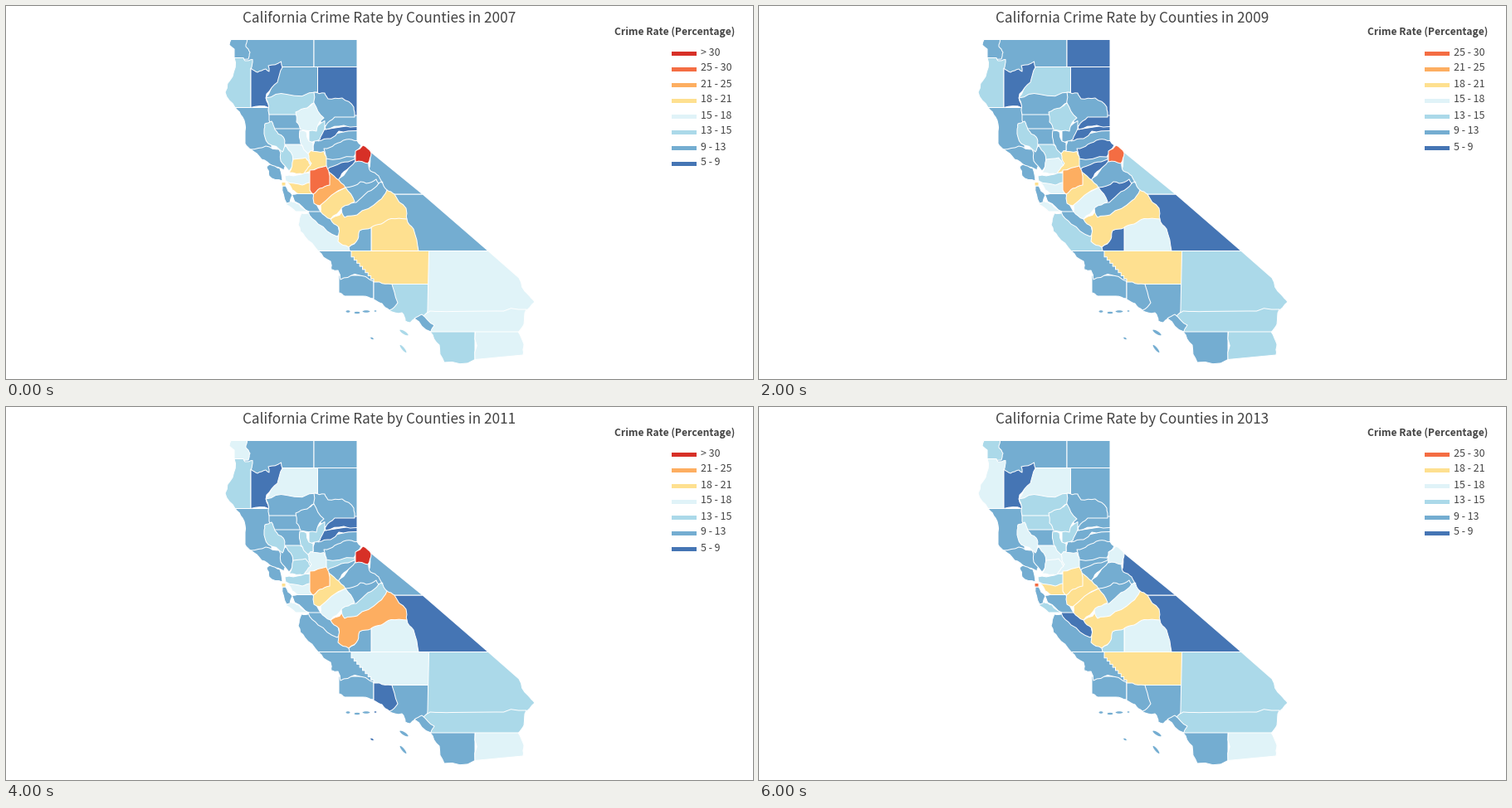
Animation of 900x450 px, one loop 7 s. Source, as a matplotlib script:

```python
import math
import random

import matplotlib.pyplot as plt
from matplotlib.animation import FuncAnimation
from matplotlib.patches import Ellipse, Polygon, Rectangle

W, H, DPI = 900, 450, 100
PX = 72 / DPI  # points per pixel
FIRST, COUNT = 2007, 7
FONT = "Noto Sans CJK JP"
INK = "#444444"

COLORS = ["#313695", "#4575b4", "#74add1", "#abd9e9", "#e0f3f8",
          "#fee090", "#fdae61", "#f46d43", "#d73027"]
BOUNDS = [5, 9, 13, 15, 18, 21, 25, 30]
LABELS = ["< 5", *(f"{a} - {b}" for a, b in zip(BOUNDS, BOUNDS[1:])), "> 30"]

# Statewide straight survey lines
TOP, MODOC, NORTH, SOUTH = 40.5, 73.5, 122.5, 295.5
EAST, KERN = 423, 509.5

rng = random.Random(4)
fig = plt.figure(figsize=(W / DPI, H / DPI), dpi=DPI, facecolor="white")
ax = fig.add_axes([0, 0, 1, 1])
ax.set_xlim(0, W)
ax.set_ylim(H, 0)
ax.axis("off")

areas = []


def ragged(a, b, depth=2):
    """Points from a up to b; surveyed or long lines stay straight."""
    dx, dy = b[0] - a[0], b[1] - a[1]
    size = math.hypot(dx, dy)
    if depth == 0 or dx == 0 or dy == 0 or size < 4 or size > 45:
        return [a]
    bend = rng.uniform(-0.1, 0.1)
    mid = (a[0] + dx / 2 - dy * bend, a[1] + dy / 2 + dx * bend)
    return ragged(a, mid, depth - 1) + ragged(mid, b, depth - 1)


def add_area(patch, level, changes):
    """Keep a patch with its level per year; changes maps a year to a level."""
    patch.set(edgecolor="white", linewidth=PX, snap=False)
    ax.add_patch(patch)
    levels = []
    for year in range(FIRST, FIRST + COUNT):
        level = changes.get(year, level)
        levels.append(level)
    areas.append((patch, levels))


def county(*corners, level=2, changes={}):
    outline = []
    for a, b in zip(corners, corners[1:] + corners[:1]):
        outline += ragged(a, b)
    add_area(Polygon(outline, joinstyle="round"), level, changes)


def island(x, y, w, h, tilt=0, level=2, changes={}):
    add_area(Ellipse((x, y), w, h, angle=tilt), level, changes)


def label(x, y, text, size, **kw):
    return ax.text(x, y, text, fontsize=size * PX, family=FONT, color=INK,
                   va="baseline", **kw)


# Later areas overlap earlier ones, so each shared border is drawn once.

# Siskiyou, Modoc, Lassen, Shasta
county((290, TOP), (371, TOP), (371, MODOC), (325, 84), (297, 84), (285, 60))
county((371, TOP), (EAST, TOP), (EAST, MODOC), (371, MODOC),
       changes={2009: 1, 2011: 2})
county((375.5, MODOC), (EAST, MODOC), (EAST, 138), (375.5, 125),
       level=1, changes={2010: 2})
county((325, MODOC), (375.5, MODOC), (375.5, 110), (310, 115),
       changes={2008: 4, 2009: 3, 2010: 4, 2012: 5, 2013: 4})

# Mendocino, Sonoma, Napa, Colusa, Glenn, Yolo, Lake
county((276, NORTH), (320, NORTH), (320, 174), (296, 173.5), (288, 166),
       (288, 151), (285, 134))
county((295, 173), (313, 169), (330, 173), (337, 190), (335, 198), (320, 193),
       (308, 185))
county((327, 168), (342, 170), (348, 184), (341, 199), (331, 187),
       changes={2007: 3, 2008: 2})
county((318, 145), (357, 145), (358, 168), (328, 168))
county((317, 128), (354, 128), (356, 148), (323, 148), (317, 138),
       changes={2013: 3})
county((336, 167), (354, 167), (366, 175), (368, 192), (362, 198), (347, 190),
       (345, 180), level=4, changes={2009: 3, 2013: 4})
county((312, 142), (320, 139), (324, 149), (334, 158), (336, 168), (333, 176),
       (316, 166), (311, 150), level=3, changes={2010: 4, 2011: 3, 2012: 4})

# Del Norte, Humboldt, Trinity, Tehama
county((271, TOP), (290.5, TOP), (289, 49), (294, 56), (292, 64), (275, 62.5),
       (275, 52), (269, 47), changes={2010: 3, 2011: 4, 2012: 3})
county((275, 62.5), (286, 62.5), (288, 66), (297, 64.5), (295, 76),
       (295, NORTH), (276, NORTH), (264, 104), (273, 85),
       level=3, changes={2010: 4, 2011: 3, 2012: 4})
county((295, 75), (303, 80), (313, 76), (317, 79), (316, 72), (331.5, 67),
       (333, 74), (327, 92), (314, 106), (317, 123), (295, NORTH),
       level=1, changes={2008: 0, 2009: 1})
county((313, 111), (338, 106.5), (375, 104), (371, 117), (363, 123),
       (352, 131), (317, 131), level=3, changes={2009: 2, 2010: 3, 2011: 2,
                                                 2012: 3})

# Placer, Nevada, Sierra, Plumas, Yuba, Butte, Sutter
county((372, 160), (EAST, 148), (EAST, 165), (390, 180), (369, 178))
county((377, 150), (EAST, 143), (EAST, 150.5), (401, 151), (391, 160),
       (376, 163), level=1, changes={2012: 2})
county((384, 142), (391, 132), (EAST, 132), (EAST, 145.5), (407, 144),
       (385, 149), changes={2008: 1, 2010: 2, 2011: 1, 2012: 2})
county((371, 104), (384, 105), (388, 112), (405, 111), (419, 122), (420, 134),
       (396, 134), (385, 145), (372, 128))
county((365, 150), (384, 138.5), (384, 148), (378, 161), (365, 165),
       level=3, changes={2009: 2, 2011: 3})
county((371, 117), (383, 135), (375, 146), (374, 151), (355, 149),
       (350, 140), (349, 128), (363, 123),
       level=4, changes={2008: 3, 2011: 2, 2013: 3})
county((354, 150), (362, 152), (365, 163), (370, 165), (370, 174), (364, 178),
       (355, 166), level=4, changes={2008: 3, 2009: 2, 2010: 3})

# Inyo, Mono, Tuolumne, Calaveras, Amador, El Dorado, Alpine, Sacramento
county((465, 227), (502, 227), (581, SOUTH), (488, SOUTH),
       changes={2009: 1, 2012: 2, 2013: 1})
county((437, 174), (502, 227), (455, 227), (436, 200),
       changes={2008: 3, 2010: 2, 2013: 1})
county((400, 209), (420, 184), (437, 189), (439, 199), (449, 205),
       (454, 213), (410, 223))
county((386, 192), (421, 181), (421, 187), (407, 200), (400, 212), (386, 208),
       level=1, changes={2008: 2, 2009: 1, 2010: 2})
county((384, 182), (420, 178), (420, 185), (404, 189), (386, 198),
       changes={2008: 3, 2009: 2, 2011: 3, 2012: 2})
county((383, 172), (396, 167), (410, 161), (EAST, 162.5), (428, 168),
       (419, 182), (385, 184), changes={2009: 1, 2011: 2, 2012: 1, 2013: 2})
county((421, 175), (430, 168), (440, 177), (436, 190), (421, 188),
       level=8, changes={2008: 7, 2010: 8, 2012: 5, 2013: 4})
county((364, 178), (367, 174.5), (383, 175.5), (386, 182), (386, 194),
       (368, 199), (357, 204), (368, 190), level=5, changes={2010: 4})

# Marin, Solano, Santa Clara, Santa Cruz, San Mateo, Alameda, Contra Costa
county((314, 194), (318, 191), (330, 196), (333, 211), (317, 205))
county((341, 201), (346, 185), (361, 183), (367, 192), (359, 203),
       level=5, changes={2008: 4, 2011: 3, 2012: 4})
county((344, 228), (352, 226), (371, 226), (382, 252), (366, 250), (348, 236))
county((337, 239), (342, 235), (353, 239), (365, 248), (349, 248),
       level=4, changes={2008: 3, 2009: 4, 2013: 3})
county((333, 217), (337, 217), (345, 228), (342, 237), (338, 238))
county((338, 210), (369, 212), (370, 226.5), (352, 226.5), (345, 222),
       level=5, changes={2009: 4, 2012: 5})
county((336, 205), (356, 203), (367, 201), (367, 213), (357, 216), (337, 211),
       level=4, changes={2009: 3})

# Monterey, San Benito, Fresno, Madera, Mariposa, Merced
county((356, 250), (366, 249), (410, 280), (416, SOUTH), (376, SOUTH),
       (360, 278), (352, 264), level=4, changes={2008: 3, 2011: 2})
county((364, 248), (380, 248), (400, 262), (402, 274), (399, 278), (376, 263),
       changes={2013: 1})
county((391, 257), (410, 244), (459, 222), (468, 227), (482, 244), (483, 257),
       (426, 280), (413, 291), (400, 284), (401, 267),
       level=5, changes={2011: 6, 2013: 5})
county((403, 243), (452, 212), (459, 222), (449, 235), (423, 252), (408, 255),
       changes={2011: 3, 2012: 4})
county((409, 219), (427, 212), (434, 214), (446, 209), (449, 214), (436, 224),
       (422, 237), (412, 238), changes={2008: 1, 2010: 2})
county((378, 238), (409, 219), (420, 236), (405, 243), (391, 257), (379, 248),
       level=5, changes={2009: 4, 2012: 5})

# Stanislaus, San Joaquin, Tulare, Kings
county((370, 226), (374, 212), (386, 198), (398, 208), (409, 219), (378, 241),
       (371, 238), level=6, changes={2009: 5})
county((366, 198), (386, 193), (390, 205), (390, 216), (378, 220), (370, 227),
       (366, 222), level=7, changes={2008: 6, 2013: 5})
county((440, 267), (452, 263), (464, 256.5), (483, 257), (491, 269),
       (497, SOUTH), (440, SOUTH), level=5, changes={2009: 4})
county((424, 281), (426, 271), (440, 267.5), (440, SOUTH), (414, SOUTH),
       (413, 291), changes={2009: 1, 2010: 2, 2013: 3})

# Santa Barbara, San Luis Obispo, Los Angeles, Ventura, Kern
county((401, 325), (443, 325), (443, 353), (430, 350), (408, 350), (401, 346))
county((376, SOUTH), (418, SOUTH), (446, 322), (445, 333), (420, 323.5),
       (403, 330), (400, 319), (392, 318), (391, 308))
county((460, 334), (509, 334), (509, 372), (493, 377), (487, 382), (481, 380),
       (477, 370), (461, 367), level=3, changes={2009: 2})
county((443, 331), (464, 332), (472, 358), (462, 367), (453, 359), (443, 354),
       changes={2011: 1, 2012: 2})
stairs = [(443 - 27 * k / 8, 333 - 34 * (k + j) / 9)
          for k in range(9) for j in (0, 1)]
county(*stairs, (416, SOUTH), (KERN, SOUTH), (KERN, 335.5), (464, 335.5),
       (450, 333), level=5, changes={2011: 4, 2012: 5})

# San Bernardino, Riverside, Orange, San Diego, Imperial
county((KERN, SOUTH), (581, SOUTH), (618, 328), (629, 348), (637, 357),
       (624, 370), (507, 374), (508, 366),
       level=4, changes={2009: 3, 2012: 4, 2013: 3})
county((503, 374), (511, 368), (537, 368.5), (590, 368), (627, 366),
       (624, 384), (617, 393.5), (512, 393.5), level=4, changes={2009: 3})
county((492, 377), (501, 372), (516, 385), (512, 393))
county((511, 393), (565, 393), (565, 426.5), (528, 430), (522, 409),
       level=3, changes={2008: 2})
county((565.5, 393), (617, 393), (624, 408), (623, 421), (565, 426.5),
       level=4, changes={2009: 3, 2010: 4})

# Islands, then San Francisco
for k in range(3):
    island(412 + 11 * k, 368.5 + 1.5 * math.sin(k * math.pi / 2),
           6 + 2 * k, 3.5)
island(445, 368, 4, 2.5, changes={2011: 1, 2012: 2})
island(441, 401, 5, 3, 30, changes={2011: 1, 2012: 2})
island(479.5, 394, 13, 4.5, 32, level=3, changes={2009: 2})
island(478.5, 413.5, 13, 4, 50, level=3, changes={2009: 2})
county((332, 212.5), (337, 212.5), (337, 217), (332, 217),
       level=5, changes={2008: 6, 2009: 5, 2012: 6, 2013: 7})

title = label(450, 20, "", 17.15, ha="center")
label(805.5, 35, "Crime Rate (Percentage)", 12, ha="center", weight="bold")

rows = []
for i in range(8):
    swatch = Rectangle((802, 55 + 19 * i), 30, 5, linewidth=0)
    ax.add_patch(swatch)
    rows.append((swatch, label(837, 59.5 + 19 * i, "", 12.4)))


def draw(i):
    title.set_text(f"California Crime Rate by Counties in {FIRST + i}")
    for patch, levels in areas:
        patch.set_facecolor(COLORS[levels[i]])
    # The legend lists only the levels in use, highest first.
    used = sorted({levels[i] for _, levels in areas}, reverse=True)
    for k, (swatch, text) in enumerate(rows):
        shown = k < len(used)
        swatch.set_visible(shown)
        text.set_visible(shown)
        if shown:
            swatch.set_facecolor(COLORS[used[k]])
            text.set_text(LABELS[used[k]])
    return []


anim = FuncAnimation(fig, draw, frames=COUNT, interval=1000,
                     init_func=lambda: draw(0), repeat=True, repeat_delay=0)
plt.show()
```
